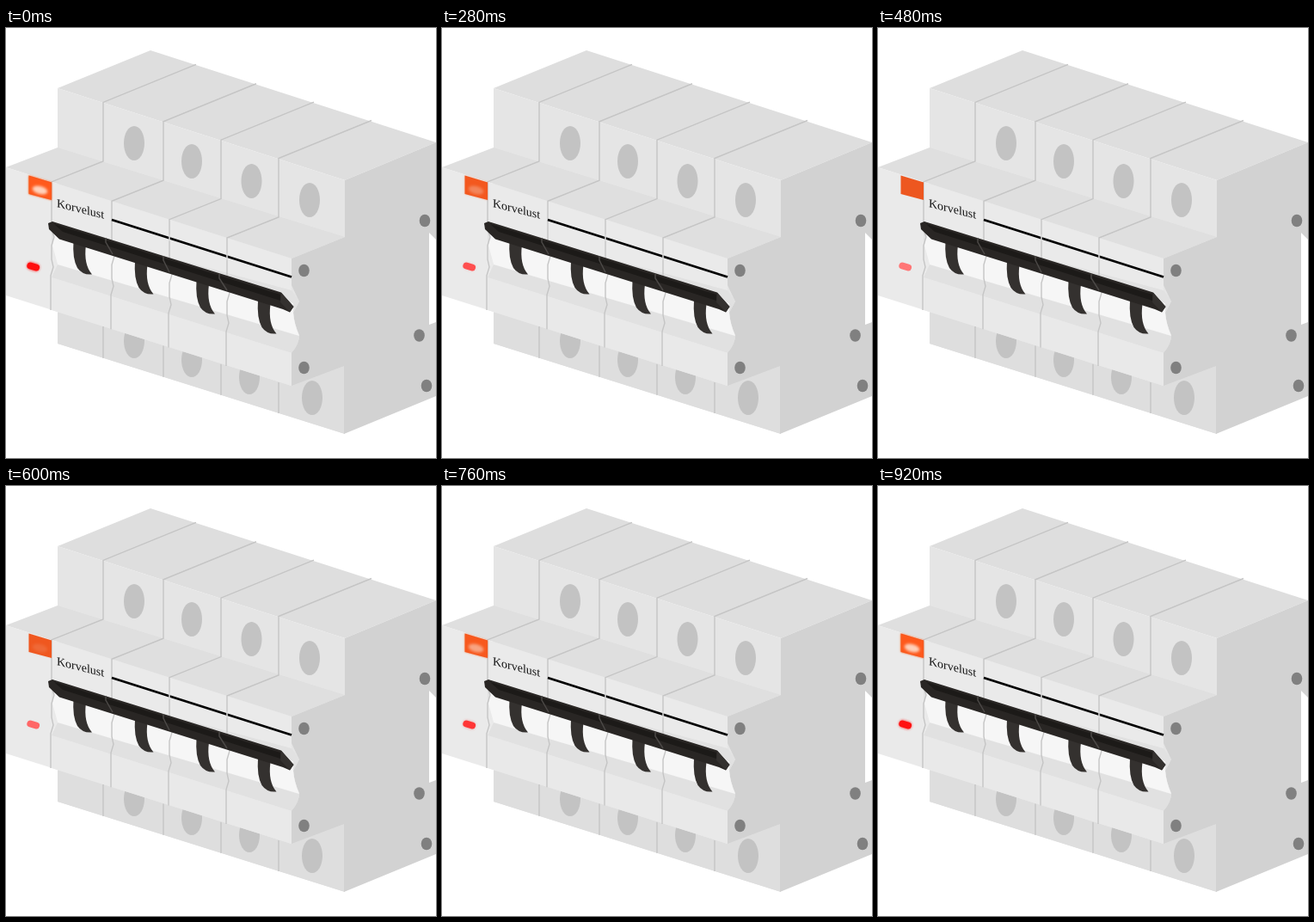
Recreate the animation shown at these times as an HTML page. Size 500 by 500 pixels, loop 0.96 s.

```html
<!DOCTYPE html>
<html lang="en">
<head>
<meta charset="utf-8">
<style>
  html, body { margin: 0; width: 100%; height: 100%; overflow: hidden; background: #fff; }
  svg { display: block; width: 100vw; height: 100vh; }
  text { font-family: "Liberation Serif", serif; }
</style>
</head>
<body>
<svg viewBox="0 0 500 500">
  <defs>
    <filter id="soft" x="-50%" y="-50%" width="200%" height="200%"><feGaussianBlur stdDeviation="1.8"/></filter>
    <filter id="halo" x="-50%" y="-50%" width="200%" height="200%"><feGaussianBlur stdDeviation="1"/></filter>
    <path id="lamp" d="M26.5 171.5L53 179.5V200L26.5 193Z"/>
    <path id="stem" d="M78.5 248L93 252Q90 275 100 286.5Q89 287.5 83 279Q77 268 78.5 248Z" fill="#34312f"/>
  </defs>

  <!-- housing -->
  <path d="M60 70L168 26L500 133L394 177Z" fill="#dedede"/>
  <path d="M60 70L394 177V472L60 367Z" fill="#e5e5e5"/>
  <path d="M60 325L394 393V472L60 367Z" fill="#dedede"/>
  <path d="M394 177L500 133V246L492 238V345L500 342V428L393 472V393L332 416V376Q341 368 341 357Q335 344 334 331L341 318L332 299V268L394 243Z" fill="#d2d2d2"/>
  <g id="terminals" fill="#c3c3c3"></g>

  <!-- front step -->
  <path d="M0 162L60 139L394 243L332 268Z" fill="#dfdfdf"/>
  <path d="M0 162L332 268V416L0 311Z" fill="#eaeaea"/>
  <path d="M53 230L332 305L341 318L334 331Q335 344 341 357Q341 368 332 378L53 290L60 275L53 248Z" fill="#e1e1e1"/>
  <path d="M56 240L334 320V331Q335 344 341 358L60 275L54 253Z" fill="#f6f6f6"/>
  <path d="M53 290L332 378V416L53 328Z" fill="#e9e9e9"/>
  <g id="seams" fill="none" stroke="#c5c5c5" stroke-width="1.4"></g>
  <path d="M123 223L332 289.5" stroke="#000" stroke-width="2.8"/>
  <path d="M190 240V248M257 262V270" stroke="#ddd" stroke-width="1.5"/>

  <!-- linked handle -->
  <g id="stems"></g>
  <path d="M49 227L54 225L320 307.5L334.5 324L330 330.5L322 327L62 245.5L50 234Z" fill="#292624"/>
  <path d="M56 228L319 310V317L66 237Z" fill="#1c1a18"/>
  <path d="M320 308L334.5 324L330 330.5L319 319Z" fill="#34312f"/>
  <path d="M116 244V249L124 263M183 265V270L190 284M248 286V291L257 305" fill="none" stroke="#4b4846" stroke-width="1.5"/>

  <g id="screws" fill="#808080"></g>
  <text transform="matrix(1 .25 0 1 59 208)" font-size="14" fill="#111">Korvelust</text>

  <!-- lamps -->
  <use href="#lamp" fill="#ed5720"/>
  <g id="glow">
    <use href="#lamp" fill="#ff5a1c" filter="url(#halo)"/>
    <ellipse cx="39.5" cy="188.5" rx="9" ry="4.5" transform="rotate(15 39.5 188.5)" fill="#ffd2bc" filter="url(#soft)"/>
  </g>
  <g transform="translate(31.7 277.5) rotate(17)">
    <rect id="ledHalo" x="-8" y="-5" width="16" height="10" rx="5" fill="#ff2020" filter="url(#halo)"/>
    <rect id="led" x="-7.5" y="-4" width="15" height="8" rx="4"/>
  </g>
</svg>
<script>
  const $ = id => document.getElementById(id);
  const ellipse = (x, y, rx, ry) => `<ellipse cx="${x}" cy="${y}" rx="${rx}" ry="${ry}"/>`;

  $('terminals').innerHTML =
    [[149, 134], [216, 155], [285.5, 178], [353, 200], [149, 364], [216, 386], [283, 406], [356, 430]]
      .map(([x, y]) => ellipse(x, y, 12, 20)).join('');

  $('screws').innerHTML =
    [[346.5, 282], [346.5, 395], [487, 224], [480.5, 357.5], [489, 416]]
      .map(([x, y]) => ellipse(x, y, 6.3, 7.3)).join('');

  const slope = 0.319;
  $('seams').innerHTML = [53, 123, 190, 257].map(x => {
    const back = x + 60;
    const top = 162 + x * slope;
    const rear = 69.5 + (back - 60) * slope;
    return `<path d="M${back + 108} ${rear - 44}L${back} ${rear}V${top - 24}L${x} ${top}v55l3 9l-3 10v16l2 9l-3 10V${311 + x * slope}
      M${back} ${311 + back * slope}V${367 + (back - 60) * 0.315}"/>`;
  }).join('');

  $('stems').innerHTML = [0, 1, 2, 3]
    .map(i => `<use href="#stem" x="${i * 71.5}" y="${i * 23}"/>`).join('');

  const period = 960, step = 40;
  function draw(now) {
    const t = Math.floor(now % period / step) * step;
    const light = (1 + Math.cos(2 * Math.PI * t / period)) / 2;
    const tint = 118 - 104 * light;
    $('glow').setAttribute('opacity', light);
    $('ledHalo').setAttribute('opacity', light * light * 0.6);
    $('led').setAttribute('fill', `rgb(255,${tint},${tint})`);
    requestAnimationFrame(draw);
  }
  draw(performance.now());
</script>
</body>
</html>
```
